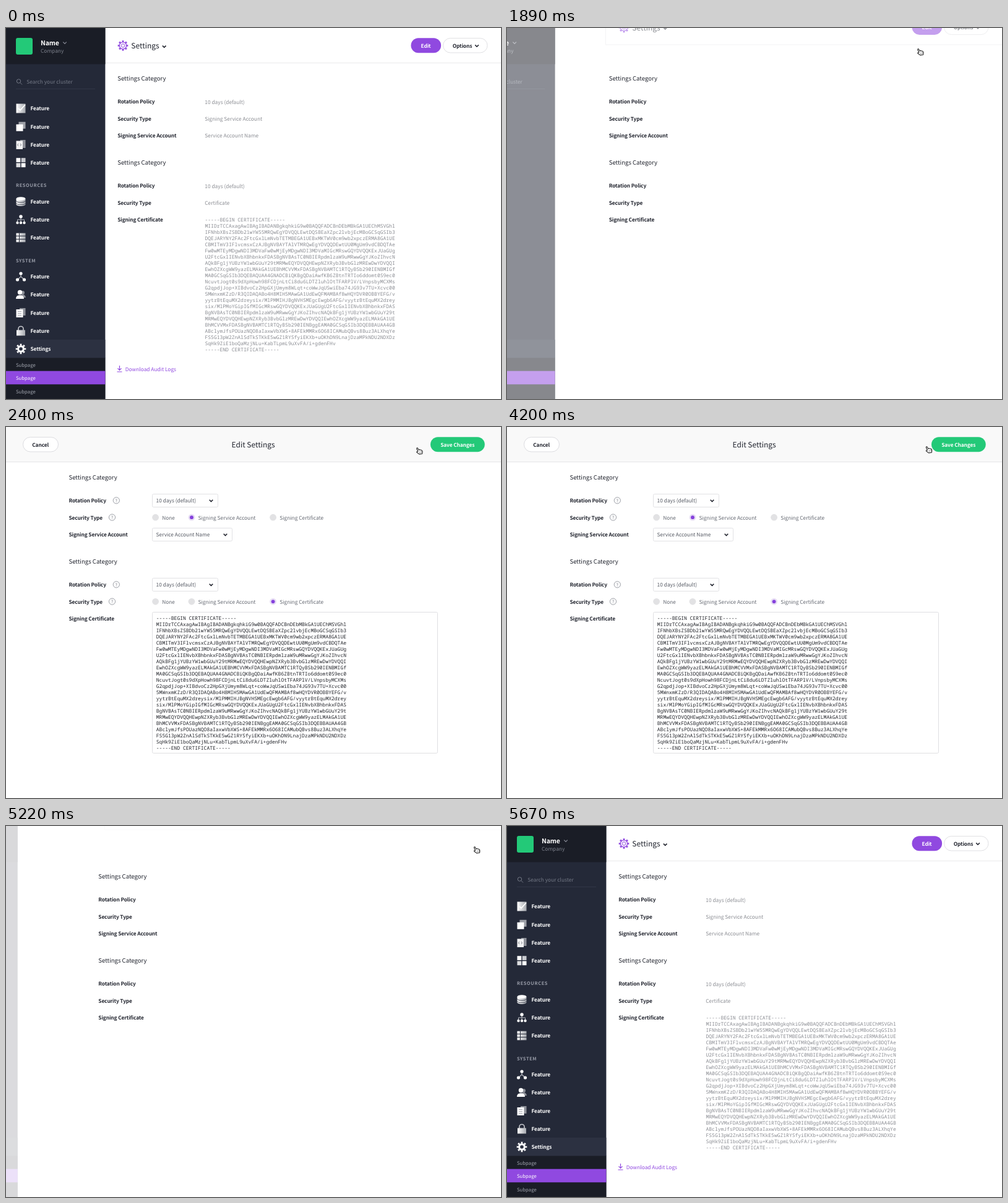
Recreate the animation shown at these times as an HTML page. Size 800 by 600 pixels, loop 6240 ms.

```html
<!DOCTYPE html>
<html lang="en">
<head>
<meta charset="utf-8">
<title>Edit settings</title>
<style>
html, body { margin: 0; width: 100%; height: 100%; overflow: hidden; background: #fff; }
svg { display: block; width: 800px; height: 600px; }
text { font-family: "Noto Sans CJK JP", "Noto Sans CJK SC", "Noto Sans CJK", sans-serif; text-rendering: geometricPrecision; white-space: pre; }
.b { font-weight: 600; letter-spacing: -.12px; }
.caps { font-weight: 600; letter-spacing: .62px; }
.mono { font: 8px "Noto Sans Mono", "Liberation Mono", monospace; }
</style>
</head>
<body>
<svg id="stage" viewBox="0 0 800 600"></svg>
<script>
const INK = '#22252f', GRAY = '#8b8d93', PURPLE = '#9049e0', GREEN = '#23c978', NIGHT = '#1a1d26', NAVY = '#242938';
const CERT = `-----BEGIN CERTIFICATE-----
MIIDrTCCAxagAwIBAgIBADANBgkqhkiG9w0BAQQFADCBnDEbMBkGA1UEChMSVGhl
IFNhbXBsZSBDb21wYW55MRQwEgYDVQQLEwtDQSBEaXZpc2lvbjEcMBoGCSqGSIb3
DQEJARYNY2FAc2FtcGxlLmNvbTETMBEGA1UEBxMKTWV0cm9wb2xpczERMA8GA1UE
CBMITmV3IFlvcmsxCzAJBgNVBAYTAlVTMRQwEgYDVQQDEwtUU0MgUm9vdCBDQTAe
Fw0wMTEyMDgwNDI3MDVaFw0wMjEyMDgwNDI3MDVaMIGcMRswGQYDVQQKExJUaGUg
U2FtcGxlIENvbXBhbnkxFDASBgNVBAsTC0NBIERpdmlzaW9uMRwwGgYJKoZIhvcN
AQkBFg1jYUBzYW1wbGUuY29tMRMwEQYDVQQHEwpNZXRyb3BvbGlzMREwDwYDVQQI
EwhOZXcgWW9yazELMAkGA1UEBhMCVVMxFDASBgNVBAMTC1RTQyBSb290IENBMIGf
MA0GCSqGSIb3DQEBAQUAA4GNADCBiQKBgQDaiAwfKB6ZBtnTRTIo6ddomt0S9ec0
NcuvtJogt0s9dXpHowh98FCDjnLtCi8du6LDTZluhlOtTFARPlV/LVnpsbyMCXMs
G2qpdjJop+XIBdvoCz2HpGXjUmym8WLqt+coWwJqUSwiEba74JG93v7TU+Xcvc00
5MWnxmKZzD/R3QIDAQABo4H8MIH5MAwGA1UdEwQFMAMBAf8wHQYDVR0OBBYEFG/v
yytrBtEquMX2dreysix/MlPMMIHJBgNVHSMEgcEwgb6AFG/vyytrBtEquMX2drey
six/MlPMoYGipIGfMIGcMRswGQYDVQQKExJUaGUgU2FtcGxlIENvbXBhbnkxFDAS
BgNVBAsTC0NBIERpdmlzaW9uMRwwGgYJKoZIhvcNAQkBFg1jYUBzYW1wbGUuY29t
MRMwEQYDVQQHEwpNZXRyb3BvbGlzMREwDwYDVQQIEwhOZXcgWW9yazELMAkGA1UE
BhMCVVMxFDASBgNVBAMTC1RTQyBSb290IENBggEAMA0GCSqGSIb3DQEBBAUAA4GB
ABclymJfsPOUazNQO8aIaxwVbXWS+8AFEkMMRx6O68ICAMubQBvs8Buz3ALXhqYe
FS5G13pW2ZnAlSdTkSTKkE5wGZ1RYSfyiEKXb+uOKhDN9LnajDzaMPkNDU2NDXDz
SqHk9ZiE1boQaMzjNLu+KabTLpmL9uXvFA/i+gdenFHv
-----END CERTIFICATE-----`.split('\n');

// Text size is given in design pixels (1200 wide).
const text = (x, y, str, fill, size = 14, attrs = '') =>
  `<text x="${x}" y="${y}" fill="${fill}" font-size="${size * .597}" ${attrs}>${str}</text>`;
const bold = (x, y, str, fill, size = 14, attrs = '') => text(x, y, str, fill, size, 'class="b" ' + attrs);
const middle = 'text-anchor="middle"';
const rect = (x, y, w, h, fill, attrs = '') => `<rect x="${x}" y="${y}" width="${w}" height="${h}" fill="${fill}" ${attrs}/>`;
const circle = (x, y, r, fill, attrs = '') => `<circle cx="${x}" cy="${y}" r="${r}" fill="${fill}" ${attrs}/>`;
const line = (d, stroke, width = 1) => `<path d="${d}" fill="none" stroke="${stroke}" stroke-width="${width}"/>`;
const chevron = (x, y, stroke = INK, width = 1.6) => line(`M${x - 2.8} ${y - 1.4}l2.8 2.8 2.8-2.8`, stroke, width);
const at = (x, y, body) => `<g transform="translate(${x} ${y})">${body}</g>`;
const group = (id, body) => `<g id="${id}">${body}</g>`;
const cert = (x, y, fill) => CERT.map((row, i) => `<text class="mono" x="${x}" y="${y + i * 10}" fill="${fill}">${row}</text>`).join('');

// Teeth are the dashes of a ring.
const gear = (color, body) =>
  circle(0, 0, 7, 'none', `stroke="${color}" stroke-width="2.6" pathLength="16" stroke-dasharray="1 1" stroke-dashoffset=".5"`) + body;

const G = 'url(#shade)';
const server = y => rect(-7.5, y, 15, 4.2, G) + rect(-3, y, 1, 4.2, NAVY);
const icons = [
  rect(-7.5, -7.5, 15, 15, G) + line('M-4 0l3 3 8-9', '#fff', 1.8),
  rect(-3.5, -7.5, 11, 11, '#9da0a7') + rect(-7.5, -3.5, 11, 11, '#fff'),
  rect(-1, -7.5, 8.5, 13, '#8d9098') + rect(-7.5, -6, 10.5, 13.5, '#f2f2f3') + line('M-4-1.5l-1.5 2 1.5 2M-1-1.5l1.5 2-1.5 2', '#666a74', .8),
  rect(-7.5, -7.5, 6.8, 6.8, '#fff') + rect(.7, -7.5, 6.8, 6.8, '#c9cbd0') + rect(-7.5, .7, 6.8, 6.8, '#dcdde0') + rect(.7, .7, 6.8, 6.8, '#fff'),
  `<path d="M-7.5-4.5v9c0 4 15 4 15 0v-9z" fill="${G}"/><ellipse cy="-4.5" rx="7.5" ry="2.8" fill="#fff"/>` + line('M-7.5-1c0 3.5 15 3.5 15 0M-7.5 2.7c0 3.5 15 3.5 15 0', NAVY, .8),
  line('M0-4V4M-5.5 4V0H5.5V4', '#b9bcc3') + circle(0, -5, 2.7, '#fff') + [-5.5, 0, 5.5].map(x => circle(x, 5, 2.2, '#fff')).join(''),
  [-7.3, -2.1, 3.1].map(server).join(''),
  line('M0-5V0L-5.5 5M0 0L5.5 5', '#b9bcc3', 1.2) + circle(0, -5, 2.6, '#fff') + circle(-5.5, 5, 2.6, '#fff') + circle(5.5, 5, 2.6, '#fff'),
  circle(3, -3, 3, '#8d9098') + '<path d="M-1 5q0-5 4-5t5 5z" fill="#8d9098"/>' + circle(-1.5, -3.5, 3.7, '#fff') + '<path d="M-8 7q0-6 6.5-6t6.5 6z" fill="#fff"/>',
  rect(-2, -7.5, 9.5, 12, '#8d9098') + rect(-7.5, -5.5, 11, 13, '#fff') + line('M-5-2h6M-5 1h6M-5 4h6', '#9a9da5', .9),
  line('M-4-1v-2.5a4 4 0 0 1 8 0V-1', '#c5c7cc', 1.6) + rect(-7, -1.5, 14, 9, G),
  gear('#fff', circle(0, 0, 4.4, 'none', 'stroke="#fff" stroke-width="3.2"'))
];
const rows = [130, 159.3, 188.5, 217.7, 280.5, 310, 339, 402, 431, 460.5, 490, 519];

const sidebar = rect(0, 0, 160.4, 600, NAVY) + rect(0, 0, 160.4, 58.5, NIGHT) +
  rect(16, 16, 27, 27, GREEN, 'rx="3"') +
  bold(56, 28, 'Name', '#fff', 17.6) + chevron(95, 24, '#888c96', 1.2) + text(56, 40.2, 'Company', '#7d818c') +
  circle(20.5, 86, 3.2, 'none', 'stroke="#747986"') + line('M23 88.5l3 3', '#747986') +
  text(33.3, 90.2, 'Search your cluster', '#747986') + line('M16 98.5H144', '#313747') +
  rect(0, 504, 160.4, 30, '#2c3141') +
  rows.map((y, i) => at(24, y, icons[i]) + bold(39.5, y + 3.2, i < 11 ? 'Feature' : 'Settings', '#fff')).join('') +
  text(16, 257.4, 'RESOURCES', '#989ca8', 12.4, 'class="caps"') + text(16, 378.9, 'SYSTEM', '#989ca8', 12.4, 'class="caps"') +
  rect(0, 533.5, 160.4, 67, NIGHT) + rect(0, 554.7, 160.4, 21.6, PURPLE) +
  [545, 566, 587.5].map((y, i) => text(16, y + 3, 'Subpage', i === 1 ? '#fff' : '#a0a4ae', 13)).join('');

const header = rect(159.5, -2, 642, 58.5, '#fff', 'stroke="#e9e9eb"') +
  at(189, 28.5, gear(PURPLE, circle(0, 0, 5.6, '#fff', `stroke="${PURPLE}" stroke-width="1.3"`) + circle(0, 0, 2.8, 'none', `stroke="${PURPLE}"`))) +
  text(202.3, 33.2, 'Settings', INK, 20) + chevron(255.7, 30) +
  rect(654.5, 16.3, 48.6, 24, PURPLE, 'rx="12"') + bold(678.5, 31.7, 'Edit', '#fff', 14, middle) +
  rect(706.5, 16.5, 71.5, 23.5, '#fff', 'rx="11.75" stroke="#e0e0e3"') + bold(721.7, 31.7, 'Options', INK) + chevron(761, 28.8);

const values = ['10 days (default)', 'Signing Service Account', 'Service Account Name', '', '10 days (default)', 'Certificate'];
const valueY = [122.5, 149.9, 177.3, 0, 258.5, 285.9];
const details = values.map((v, i) => v && text(321.3, valueY[i], v, GRAY)).join('') + cert(321.5, 313.3, GRAY) +
  line('M183.5 546v7M180.5 550.3l3 3 3-3M179.5 556h8', PURPLE, 1.2) + text(192.8, 554.7, 'Download Audit Logs', PURPLE);

const labels = [85, 221].map(y => text(180.2, y, 'Settings Category', INK, 16)).join('') +
  [[122.2, 'Rotation Policy'], [149.6, 'Security Type'], [177, 'Signing Service Account'],
   [258.2, 'Rotation Policy'], [285.6, 'Security Type'], [313, 'Signing Certificate']]
    .map(([y, s]) => bold(180.2, y, s, INK)).join('');

const editHeader = rect(0, -1, 800, 57.5, '#f9f9f9') + line('M0 56.5H800', '#e5e5e7') +
  rect(27.5, 16.5, 57, 23.5, '#fff', 'rx="11.75" stroke="#dcdce0"') + bold(55.6, 31.7, 'Cancel', INK, 14, middle) +
  text(399.6, 33.2, 'Edit Settings', INK, 20, middle) +
  rect(686, 16.3, 87.7, 24, GREEN, 'rx="12"') + bold(729.7, 31.7, 'Save Changes', '#fff', 14, middle);

const help = (x, y) => circle(x, y, 5.1, 'none', 'stroke="#8f929a" stroke-width=".9"') + text(x, y + 2.8, '?', '#777a83', 12, middle);
const select = (y, w, label) => rect(236.5, y, w, 21, '#fff', 'rx="2" stroke="#e1e1e4"') +
  text(242.6, y + 13.9, label, '#555963') + chevron(225.5 + w, y + 10.7);
const radios = (y, on) => [[241.6, 'None'], [300, 'Signing Service Account'], [431.6, 'Signing Certificate']]
  .map(([x, s], i) => circle(x, y, 5.4, i === on ? '#e6dcf4' : '#e2e2e4') + (i === on ? circle(x, y, 2.9, '#8540dc') : '') +
    text(x + 10.6, y + 3.4, s, '#666a73')).join('');
const form = help(178.3, 118.8) + help(171.5, 146.1) + help(178.3, 254.8) + help(171.5, 282.2) +
  select(108.5, 106, '10 days (default)') + radios(146.2, 1) + select(163.5, 129, 'Service Account Name') +
  select(244.5, 106, '10 days (default)') + radios(282.3, 2) +
  rect(236.5, 299.5, 461, 228, '#fff', 'rx="2" stroke="#dfdfe2"') + cert(242.8, 311.8, '#23252b');

const hand = `<path d="M-2.4 1L-4.5-3.5Q-4.6-5.2-3.1-4.8L-1-1.4.2-2 1.6-1.6 3.2-1.2Q4.8-.7 4.8 1.5L4.5 4.7-.4 5.3-4.5 2.2Q-4.6.6-2.4 1Z" fill="#fff" stroke="#222" stroke-width="1.1" stroke-linejoin="round"/>` +
  line('M.2 1.2v2M1.9 1v2M3.4 .9v2', '#444', .6);

const $ = id => document.getElementById(id);
$('stage').innerHTML = '<linearGradient id="shade"><stop stop-color="#fff"/><stop offset="1" stop-color="#a5a8ae"/></linearGradient>' +
  group('header', header) + group('details', details) + group('form', form) + group('labels', labels) +
  group('sidebar', sidebar) + group('editHeader', editHeader) + group('cursor', hand);

const clamp = v => Math.max(0, Math.min(1, v));
const span = (t, start, length) => clamp((t - start) / length);
const sineOut = v => Math.sin(clamp(v) * Math.PI / 2);
const quad = (a, b, c, s) => (1 - s) ** 2 * a + 2 * s * (1 - s) * b + s * s * c;

function place(id, x, y, opacity = 1) {
  $(id).setAttribute('transform', `translate(${x} ${y})`);
  $(id).setAttribute('opacity', opacity);
}

function cursorAt(t) {
  if (t < 4170) {
    const s = (1 - Math.cos(Math.PI * span(t, 840, 750))) / 2;
    return [quad(830, 672, 668.2, s), quad(198, 203, 38.6, s)];
  }
  if (t < 5430) {
    const s = 1 - (1 - span(t, 4170, 600)) ** 3;
    return [668.2 + 92.8 * s, 38.6 - 16 * s * (1 - s)];
  }
  const s = span(t, 5430, 240) ** 1.5;
  return [761 + 47 * s, 38.6 + 5 * s];
}

function draw() {
  const t = performance.now() % 6240;
  // 0 = overview, 1 = edit form
  const p = t < 4500 ? span(t, 1770, 615) : 1 - span(t, 4893, 540);
  const away = sineOut(p / .57), fade = 1 - sineOut(p / .62), enter = span(p, .5, .5);
  place('sidebar', -160.4 * away, 0, fade);
  place('header', 0, -57 * away, fade);
  place('details', 0, 0, 1 - clamp(p / .18));
  place('labels', -78.7 * p, 0);
  place('form', 0, 0, enter);
  place('editHeader', 0, -57 * (1 - sineOut(enter)), enter);
  place('cursor', ...cursorAt(t), t > 840 && t < 5670 ? 1 : 0);
  requestAnimationFrame(draw);
}
draw();
</script>
</body>
</html>
```
